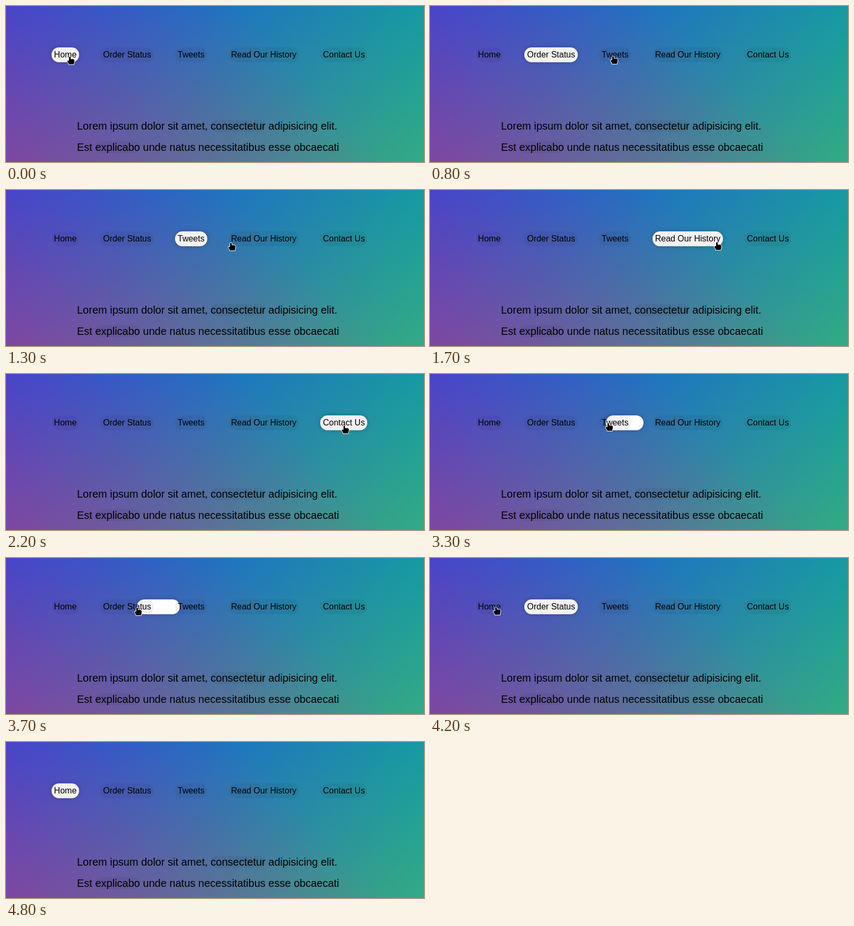
An HTML page that plays this animation: 789 px wide and 294 px high, repeating every 5.4 s.

```html
<!DOCTYPE html>
<html lang="en">
<head>
<meta charset="utf-8">
<title>Follow along links</title>
<style>
  html, body { margin: 0; width: 100%; height: 100%; overflow: hidden; }
  body { position: relative; font-family: "Liberation Sans", Arial, sans-serif; }
  #page {
    position: absolute; left: -456px; top: -22px; width: 1680px; height: 1050px;
    isolation: isolate;
    background:
      linear-gradient(45deg, hsla(340,100%,55%,1) 0%, hsla(340,100%,55%,0) 70%),
      linear-gradient(135deg, hsla(225,95%,50%,1) 10%, hsla(225,95%,50%,0) 80%),
      linear-gradient(225deg, hsla(140,90%,50%,1) 10%, hsla(140,90%,50%,0) 80%),
      hsl(35,95%,55%);
  }
  .link { color: #000; background: rgba(0,0,0,.05); border-radius: 20px; }
  nav { position: absolute; top: 100px; width: 100%; display: flex; justify-content: center; gap: 40px; }
  nav .link { padding: 5px; font-size: 16px; line-height: 18px; white-space: nowrap; }
  p { position: absolute; left: 590px; top: 228px; margin: 0; font-size: 20px; line-height: 40px; white-space: nowrap; }
  #highlight {
    position: absolute; left: 0; top: 100px; height: 28px; z-index: -1;
    background: #fff; border-radius: 20px; box-shadow: 0 0 10px rgba(0,0,0,.2);
  }
  svg { position: absolute; left: 0; top: 0; width: 789px; height: 294px; }
</style>
</head>
<body>
<div id="page">
  <div id="highlight"></div>
  <nav>
    <span class="link">Home</span>
    <span class="link">Order Status</span>
    <span class="link">Tweets</span>
    <span class="link">Read Our History</span>
    <span class="link">Contact Us</span>
  </nav>
  <p>Lorem ipsum dolor sit amet, <span class="link">consectetur</span> adipisicing elit.<br>Est <span class="link">explicabo</span> unde natus necessitatibus esse obcaecati</p>
</div>
<svg viewBox="0 0 789 294">
  <g id="cursor" stroke="#fff" stroke-linejoin="round">
    <path id="hand" d="M-2.5 1Q-.5 -.9 1.5 1V4.6H6Q8.5 5 8.5 7.5V11L7.5 13V15.5H-3V13.5L-5.5 10V7.5H-2.5Z"/>
    <path id="arrow" d="M0 0V14L3.2 11L5.3 16L7.5 15L5.4 10.2H10Z"/>
  </g>
</svg>
<script>
const LOOP = 5400, STEP = 100, GLIDE = 200, LAG = 75, END = 4800;
const $ = id => document.getElementById(id);
const page = $("page").getBoundingClientRect();
const boxes = [...document.querySelectorAll("nav .link")].map(a => a.getBoundingClientRect());

// Key points of the pointer tip: [time, x, y]
const route = [
  [0, 121, 95], [600, 270, 95], [800, 346, 94], [1300, 425, 99], [1900, 600, 98], [2200, 639, 97],
  [2400, 450, 94], [2900, 426, 91], [3700, 248, 93], [4200, 125, 92], [4500, 111, 88], [4600, 112, 53], [END, 2, -43]
];

const mix = (a, b, p) => a + (b - a) * p;

// cubic-bezier(.25, .1, .25, 1)
function ease(x) {
  if (x <= 0) return 0;
  if (x >= 1) return 1;
  const bezier = (s, a, b) => 3 * s * (1 - s) ** 2 * a + 3 * s * s * (1 - s) * b + s ** 3;
  let lo = 0, hi = 1;
  for (let i = 0; i < 24; i++) {
    const mid = (lo + hi) / 2;
    if (bezier(mid, .25, .25) < x) lo = mid; else hi = mid;
  }
  return bezier(lo, .1, 1);
}

// The picture steps ten times a second, with one pause and a rest at the end.
function stepped(ms) {
  const t = Math.floor(ms / STEP) * STEP;
  return t > 2400 && t < 2900 ? 2400 : Math.min(t, END);
}

function pointerAt(t) {
  const i = Math.max(1, route.findIndex(k => k[0] >= t));
  const [t0, x0, y0] = route[i - 1], [t1, x1, y1] = route[i];
  const p = (t - t0) / (t1 - t0);
  return { x: Math.round(mix(x0, x1, p)), y: Math.round(mix(y0, y1, p)) };
}

const linkAt = ({ x, y }) =>
  boxes.findIndex(b => x >= b.left && x <= b.right && y >= b.top && y <= b.bottom);

// Each newly entered link sends the highlight on its way a moment later.
const moves = [{ time: -GLIDE, link: 0 }];
for (let t = 0; t < END; t += 5) {
  const link = linkAt(pointerAt(t));
  if (link >= 0 && link !== moves.at(-1).link) moves.push({ time: t + LAG, link });
}

function highlightAt(t) {
  const i = moves.findLastIndex(m => m.time <= t);
  const to = boxes[moves[i].link], from = boxes[moves[Math.max(0, i - 1)].link];
  const p = ease((t - moves[i].time) / GLIDE);
  return { left: mix(from.left, to.left, p), width: mix(from.width, to.width, p) };
}

const show = (id, visible) => { $(id).style.display = visible ? "" : "none"; };

function draw(ms) {
  const t = stepped(ms), tip = pointerAt(t), glow = highlightAt(t);
  const onLink = linkAt(tip) >= 0;
  $("highlight").style.left = glow.left - page.left + "px";
  $("highlight").style.width = glow.width + "px";
  $("cursor").setAttribute("transform", `translate(${tip.x} ${tip.y})`);
  show("cursor", t < END);
  show("hand", onLink);
  show("arrow", !onLink);
}

const start = performance.now();
function tick() {
  draw((performance.now() - start) % LOOP);
  requestAnimationFrame(tick);
}
tick();
</script>
</body>
</html>
```
